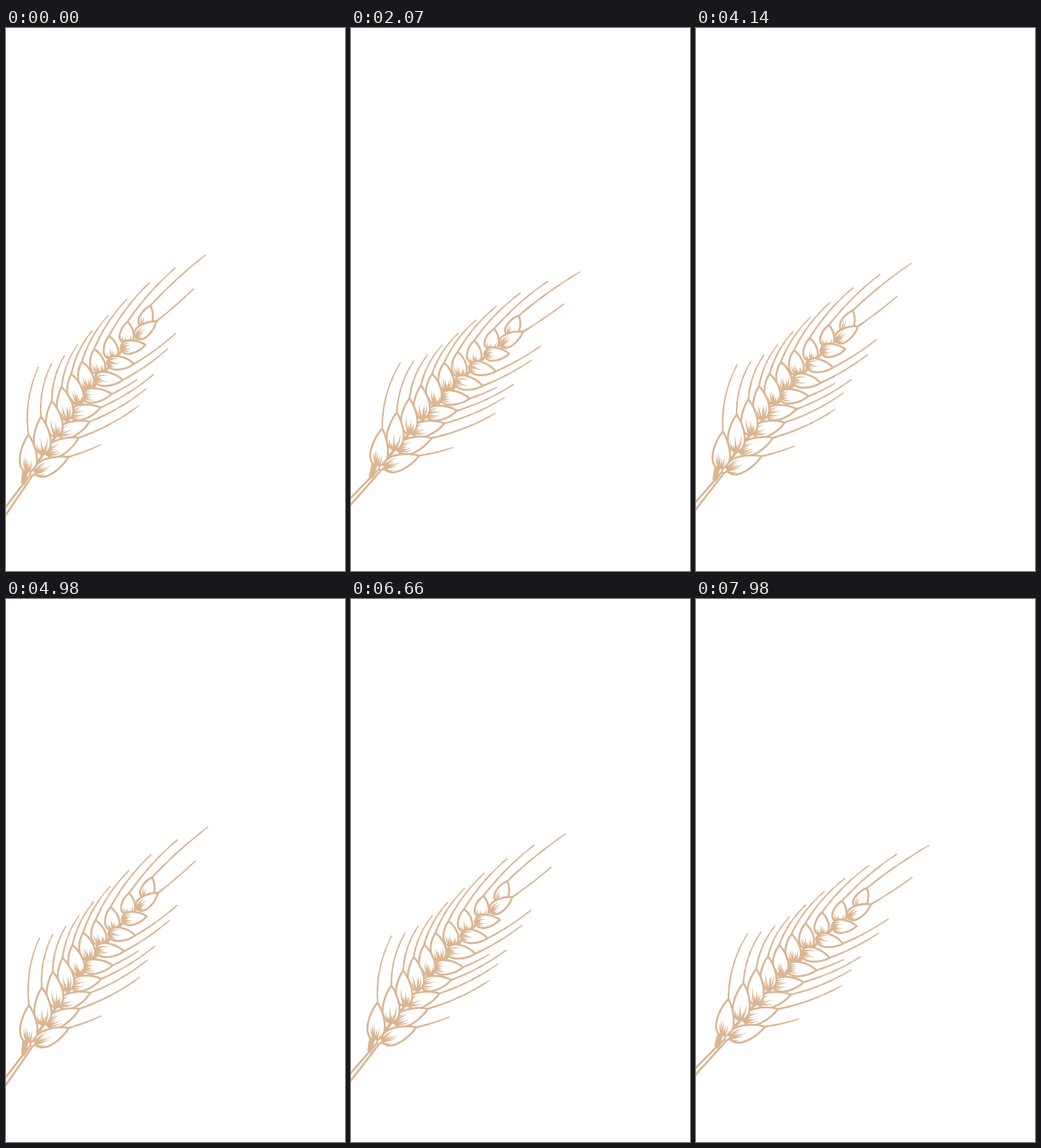
An HTML page for the animation above (8000 ms loop, 500x800 px).

```html
<!DOCTYPE html>
<html lang="en">
<head>
<meta charset="utf-8">
<title>Wheat ear</title>
<style>
  html, body { margin: 0; width: 100%; height: 100%; overflow: hidden; background: #fff; }
  svg { display: block; width: 100%; height: 100%; }
</style>
</head>
<body>
<svg viewBox="0 0 500 800"><g id="ear"></g></svg>
<script>
const INK = '#dab693';
const LOOP = 8000, STEP = 30, SWAY = 5430, LEAD = 10, SWING = 8;
const PIVOT = [111, 701];
const ear = document.getElementById('ear');

let seed = 11;
const rand = () => (seed = (seed * 16807) % 2147483647) / 2147483647;

function add(d, style) {
  const path = document.createElementNS('http://www.w3.org/2000/svg', 'path');
  path.setAttribute('d', d);
  for (const key in style) path.setAttribute(key, style[key]);
  ear.append(path);
}
const stroke = (d, width) => add(d, { fill: 'none', stroke: INK, 'stroke-width': width, 'stroke-linecap': 'round' });
const fill = (d, color = INK) => add(d, { fill: color });
const text = p => p.map(v => v.toFixed(1)).join(' ');
const poly = pts => 'M' + pts.map(text).join('L') + 'Z';

// Point on the cubic that passes through four evenly spaced points.
function along(rail, t) {
  const a = t * 3, b = a - 1, c = a - 2, d = a - 3;
  const w = [-b * c * d / 6, a * c * d / 2, -a * b * d / 2, a * b * c / 6];
  return [0, 1].map(k => rail.reduce((sum, p, i) => sum + w[i] * p[k], 0));
}

// Local frame: fraction of the way from one point to another, and pixels to its left.
function frame([x0, y0], [x1, y1]) {
  const dx = x1 - x0, dy = y1 - y0, len = Math.hypot(dx, dy);
  return (f, side) => [x0 + dx * f + dy / len * side, y0 + dy * f - dx / len * side];
}

// Bristle: a bowed, slightly uneven line that thins out towards its tip.
function awn(base, tip, bow, reach) {
  const at = frame(base, tip), left = [], right = [], n = 20;
  const height = bow * Math.hypot(tip[0] - base[0], tip[1] - base[1]);
  for (let i = 0; i <= n; i++) {
    const f = i / n * reach, side = 4 * height * f * (1 - f);
    const half = 1.3 - .4 * i / n + .4 * (rand() - .5);
    left.push(at(f, side + half));
    right.unshift(at(f, side - half));
  }
  fill(poly(left.concat(right)));
}

// Kernel: a pointed husk with short ragged strokes fanning out of its base.
function kernel({ base, tip, size }) {
  const at = frame(base, tip), pt = (f, side) => text(at(f, side * size));
  add(`M${pt(0, 0)}C${pt(.12, 1.75)} ${pt(.76, .8)} ${pt(1, 0)}C${pt(.76, -.8)} ${pt(.12, -1.75)} ${pt(0, 0)}Z`,
      { fill: '#fff', stroke: INK, 'stroke-width': 2.9, 'stroke-linejoin': 'round' });
  for (let k = -.8; k < 1; k += .32) {
    const side = size * (k + .2 * (rand() - .5)), reach = .2 + .32 * rand();
    fill(poly([at(0, side * .2 + 1.6), at(reach * .5, side * .65 + 1), at(reach, side * .8),
               at(reach * .5, side * .65 - 1), at(0, side * .2 - 1.6)]));
  }
}

// Each side of the ear: rails for kernel bases, kernel tips and bristle ends.
const sides = [
  {
    count: 10, size: 13, shrink: .3, bow: .07,
    bases: [[33, 656], [90, 578], [138, 510], [202, 442]],
    tips: [[33, 599], [82, 529], [130, 473], [213, 409]],
    ends: [[48, 499], [106, 466], [179, 399], [295, 334]],
    reach: () => 1
  },
  {
    count: 9, size: 12, shrink: .3, bow: -.04,
    bases: [[42, 656], [88, 580], [136, 508], [190, 456]],
    tips: [[92, 632], [134, 566], [178, 511], [222, 432]],
    ends: [[185, 588], [214, 517], [243, 465], [277, 384]],
    reach: i => [.5, 1, 1, 1, .5, 1, 1, 0, 1][i]
  }
];

const kernels = [];
stroke('M36 656Q66 610 92 577T145 508T200 442', 4);
for (const s of sides) {
  for (let i = 0; i < s.count; i++) {
    const t = i / (s.count - 1), base = along(s.bases, t), tip = along(s.tips, t);
    kernels.push({ base, tip, size: s.size - s.shrink * i });
    if (s.reach(i)) awn(tip, along(s.ends, t), s.bow * (1 - t * t * .7), s.reach(i));
  }
}
// Lower kernels overlap the ones above.
kernels.sort((p, q) => p.base[1] - q.base[1]).forEach(kernel);

// Stem and the knot where it meets the ear.
stroke('M-24 736Q4 700 26 671', 3);
stroke('M-24 752Q2 714 15 695T38 661', 3);
fill('M24 650Q34 654 47 652L42 660L35 661L27 674L22 671Q23 659 24 650Z');
fill('M37 659Q36 653 41 653Q44 656 37 659Z', '#fff');
fill('M31 662Q31 656 34 654Q36 657 31 662Z', '#fff');

function draw() {
  const t = Math.floor(performance.now() % LOOP / STEP) * STEP;
  const angle = SWING / 2 * (1 - Math.cos((t + LEAD) / SWAY * 2 * Math.PI));
  ear.setAttribute('transform', `rotate(${angle.toFixed(3)} ${PIVOT.join(' ')})`);
  requestAnimationFrame(draw);
}
draw();
</script>
</body>
</html>
```
